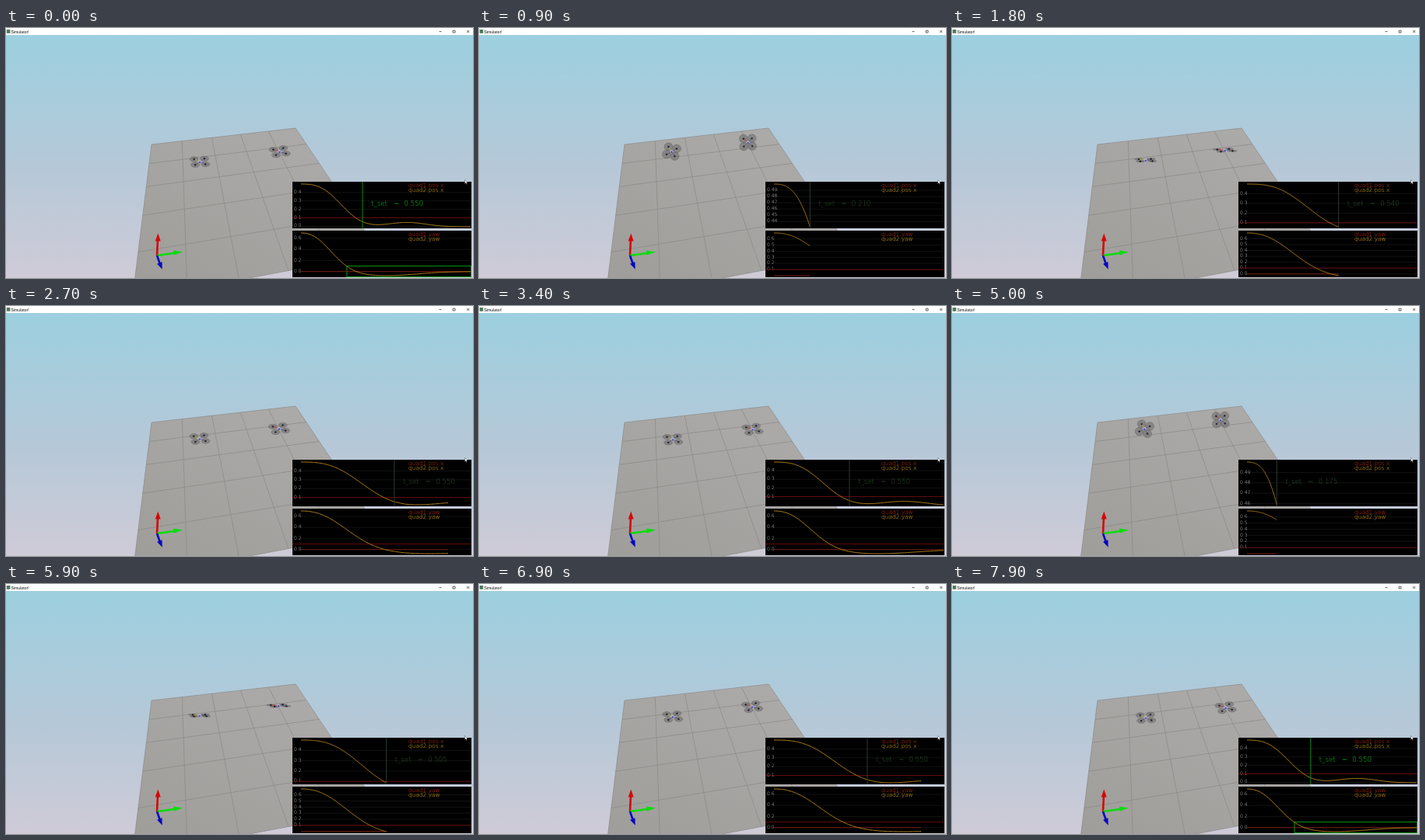
These frames come from a looping animation (600 by 322 pixels, 8 s). An HTML page with a canvas:

```html
<!DOCTYPE html>
<html lang="en">
<head>
<meta charset="utf-8">
<title>Simulator!</title>
<style>
  html, body { margin: 0; width: 100%; height: 100%; overflow: hidden; background: #cdccd8; }
  svg, canvas { position: absolute; left: 0; top: 0; width: 600px; height: 322px; }
</style>
</head>
<body>
<svg viewBox="0 0 600 322">
  <defs>
    <linearGradient id="sky" x2="0" y2="1">
      <stop offset="0" stop-color="#9bd0e0"/>
      <stop offset=".55" stop-color="#b5c8d8"/>
      <stop offset="1" stop-color="#cfcbd7"/>
    </linearGradient>
    <linearGradient id="ground" x1="0" y1=".8" x2=".6" y2="0">
      <stop offset="0" stop-color="#9f9e9b"/>
      <stop offset="1" stop-color="#acaaa8"/>
    </linearGradient>
  </defs>
  <rect width="600" height="322" fill="url(#sky)"/>
  <path id="floor" fill="url(#ground)"/>
  <path id="tiles" fill="none" stroke="#8a8886" stroke-width=".7"/>

  <g stroke-width="2.6">
    <path d="M194 293L195 272" stroke="#d40808"/>
    <path d="M195.3 264.5l3.4 10h-7z" fill="#d40808"/>
    <path d="M194 293L216 290" stroke="#08dc08"/>
    <path d="M227 288.6l-12 -2.2l.8 6z" fill="#08dc08"/>
    <path d="M194 293L197.5 303" stroke="#0808c0"/>
    <path d="M200.7 310.8l-6.6 -7l6.4 -2.5z" fill="#0808c0"/>
  </g>

  <rect width="600" height="9" fill="#fff"/>
  <rect x=".8" y="2" width="4.6" height="4.8" fill="#4d7a5c"/>
  <text x="6.6" y="6.5" font-size="5.1" font-family="'Liberation Sans', Arial, sans-serif" fill="#111">Simulator!</text>
  <path d="M556.5 4.6h3M574.2 3.2h2.8v2.8h-2.8zM592.2 3l3 3m0 -3l-3 3" fill="none" stroke="#222" stroke-width=".7"/>
</svg>
<canvas id="view" width="600" height="322"></canvas>
<svg viewBox="0 0 600 322">
  <path d="M589.5 195.5v5l1.3 -1.1l.9 1.8l.7 -.4l-.8 -1.7l1.4 -.1z" fill="#fff" stroke="#333" stroke-width=".4"/>
</svg>
<script>
const LOOP = 8000, STEP = 100;
const LEFT = 379, WIDTH = 218, EDGE = 368, RIGHT = 597.5;
const FONT = '"DejaVu Sans", Verdana, sans-serif';
const SETTLED = .55;   // simulated second at which the timer stops
const CONFIRM = 1.41;  // second at which yaw counts as settled
const ctx = document.getElementById('view').getContext('2d');

// Floor in perspective, u and v running over the unit square
const ground = (u, v) => {
  const w = 1 + .0797 * u - .4453 * v;
  return [(187 + 214.6 * u - 97.1 * v) / w, (150 - 10.7 * u + 44.7 * v) / w];
};
const path = points => 'M' + points.map(p => ground(...p).map(n => n.toFixed(1))).join('L');
document.getElementById('floor').setAttribute('d', path([[0, 0], [1, 0], [1, 1], [0, 1]]) + 'Z');
document.getElementById('tiles').setAttribute('d', Array.from({ length: 6 }, (_, i) =>
  path([[i / 5, 0], [i / 5, 1]]) + path([[0, i / 5], [1, i / 5]])).join(''));

// Step responses: a smooth fall plus one overshoot
const bell = (t, mid, width) => Math.exp(-(((t - mid) / width) ** 2));
const fall = (t, scale, power) => Math.exp(-((t / scale) ** power));
const posAt = t => .5 * fall(t, .415, 2.88) + .049 * bell(t, .95, .234) - .005 * t;
const yawAt = t => .7 * fall(t, .33, 2.4) - .075 * bell(t, .75, .39);
// How open the rotor discs look: 1 is face-on, 0 edge-on
const openAt = t => .55 + .38 * bell(t, .2, .13) - .42 * bell(t, .5, .12);

// Simulated seconds: steady at first, then speeding up until the next run
function simTime(ms) {
  const start = [4600, 400, -3360].find(s => ms >= s);
  const s = (ms - start) / 1000;
  return .03 + .364 * s + .235 * Math.max(0, s - 2.3) ** 2;
}

function line(points, color, width = 1) {
  ctx.beginPath();
  points.forEach(p => ctx.lineTo(...p));
  ctx.strokeStyle = color;
  ctx.lineWidth = width;
  ctx.stroke();
}
const level = (y, color, from = EDGE, to = RIGHT) => line([[from, y], [to, y]], color, .9);

function text(str, x, y, size, color) {
  ctx.font = `200 ${size}px ${FONT}`;
  ctx.fillStyle = color;
  ctx.fillText(str, x, y);
}
function disc(x, y, rx, ry, fill, stroke = fill) {
  ctx.beginPath();
  ctx.ellipse(x, y, rx, ry, 0, 0, Math.PI * 2);
  ctx.fillStyle = fill;
  ctx.fill();
  ctx.strokeStyle = stroke;
  ctx.lineWidth = .5;
  ctx.stroke();
}

function drone(x, y, turn, open, front) {
  const reach = 12 - 4.7 * open;
  const tips = [0, 1, 2, 3].map(i => {
    const a = Math.PI * (i / 2 + .25) + turn;
    return [x + reach * Math.cos(a), y + reach * Math.sin(a) * open];
  });
  tips.forEach(([tx, ty]) => disc(tx, ty, 5.4, Math.max(.9, 5.7 * open), 'rgba(100,98,100,.5)', '#666466'));
  tips.forEach((tip, i) => line([[x, y], tip], i === 2 ? front : '#5c5c70', .9));
  tips.forEach(([tx, ty]) => disc(tx, ty, 1, .9, '#1c1c28'));
  disc(x, y, 2, 1.4, '#b9b9d8');
  disc(x, y + .6, 1, .8, '#3038a8');
}

function panel(top, curve, T, opt) {
  const bottom = top + 60;
  const px = t => LEFT + WIDTH * t / Math.max(1, T);
  const samples = Array.from({ length: 161 }, (_, i) => [T * i / 160, curve(T * i / 160)]);
  const values = samples.map(s => s[1]).concat(opt.zero ? 0 : []);
  const max = Math.max(...values), min = Math.min(...values);
  const range = Math.max(max - min, .002);
  const py = v => top + 3 + 55 * (max - v) / range;

  ctx.save();
  ctx.beginPath();
  ctx.rect(EDGE, top, 230, 60);
  ctx.clip();
  ctx.fillStyle = '#000';
  ctx.fillRect(EDGE, top, 230, 60);

  const step = [.001, .002, .005, .01, .02, .05, .1, .2].find(s => range / s <= 7.3);
  const digits = step < .01 ? 3 : step < .1 ? 2 : 1;
  for (let n = Math.ceil(min / step); n * step < max - step * .2; n++) {
    if (n * step - min < range * .012) continue;
    const y = py(n * step);
    level(y, '#161616', LEFT);
    text((n * step).toFixed(digits), 370, y + 1.2, 6, '#e4e4e4');
  }

  const band = py(.1);
  if (opt.boxed) {
    ctx.strokeStyle = '#009612';
    ctx.lineWidth = 1;
    ctx.strokeRect(px(opt.enter), band, RIGHT - px(opt.enter), Math.min(py(-.1), bottom - .5) - band);
  } else {
    level(band, '#700c0c');
  }
  if (opt.zero) level(py(0), '#84200f', px(0), px(T));
  line(samples.map(([t, v]) => [px(t), py(v)]), '#b8841a', .95);

  if (opt.timer) {
    const t = Math.min(T, SETTLED), x = px(t), lit = T >= CONFIRM;
    line([[x, top], [x, bottom]], lit ? '#058a12' : '#2e3a30');
    const label = (s, dx) => text(s, x + dx, 229.2, 8.6, lit ? '#08d420' : '#2c562a');
    label('t_set', 11);
    label('=', 40);
    label((Math.round(t * 200) / 200).toFixed(3), 53.5);
  }
  text('quad1.' + opt.name, 517, top + 6.8, 7.4, '#d8321a');
  text('quad2.' + opt.name, 517, top + 13.3, 7.4, '#f4b81c');
  ctx.restore();
}

const start = performance.now();
function draw() {
  const ms = Math.max(0, performance.now() - start) % LOOP;
  const T = simTime(Math.floor(ms / STEP) * STEP);
  const x = posAt(T), open = openAt(T);
  ctx.clearRect(0, 0, 600, 322);
  drone(249 - 3.5 * x, 172 - 30 * x, .7 * yawAt(T) - .1, open, '#b8a83a');
  drone(351.5 - 14 * x, 159 - 27 * x, -.6 * Math.min(.5, 1 - open), open, '#c03a3a');
  panel(198, posAt, T, { name: 'pos.x', timer: true, boxed: T >= 1 + SETTLED, enter: .487 });
  panel(261, yawAt, T, { name: 'yaw', zero: true, boxed: T >= CONFIRM, enter: CONFIRM - 1 });
  requestAnimationFrame(draw);
}
draw();
</script>
</body>
</html>
```
